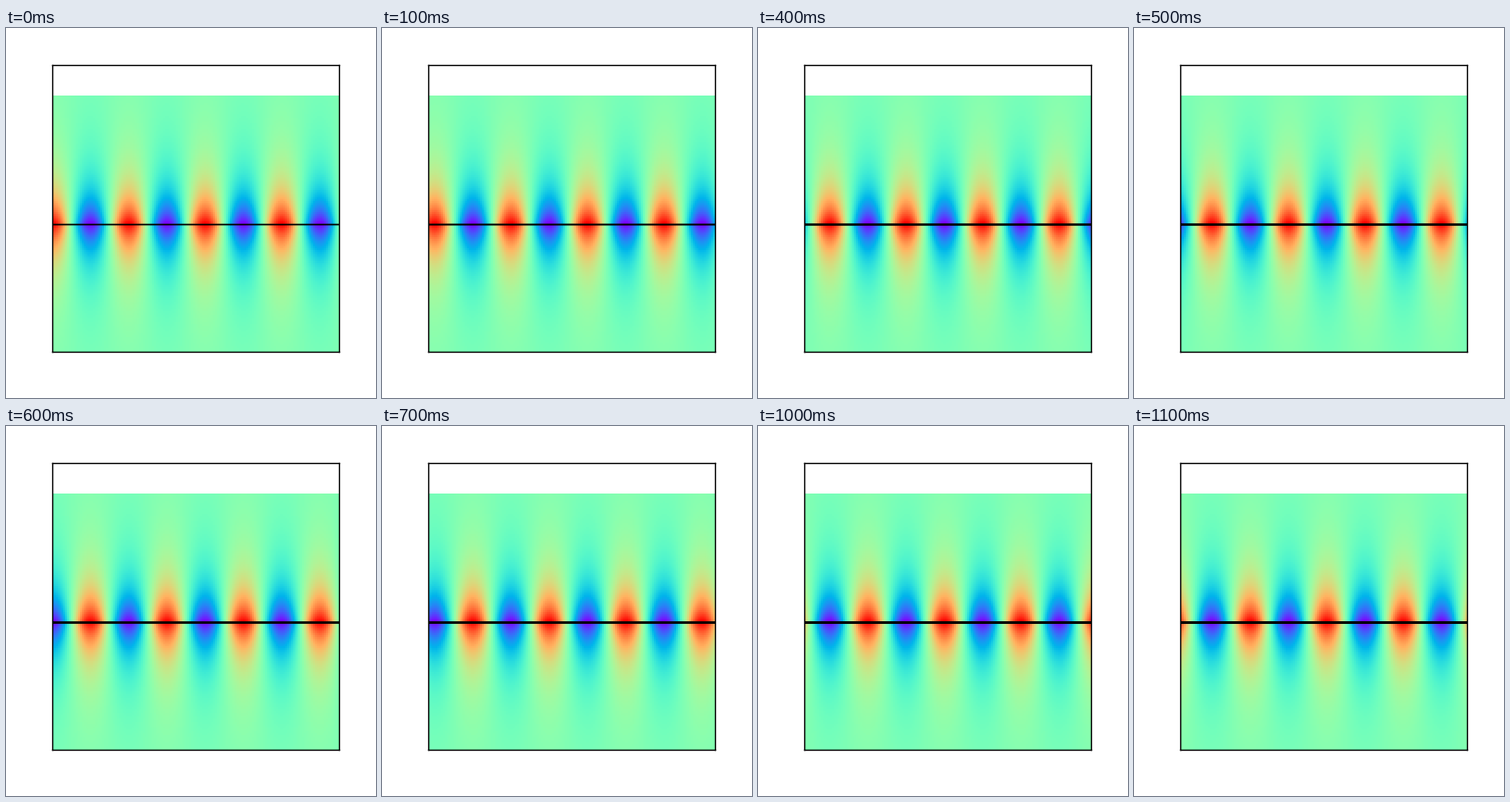
Animation of 400x400 px, one loop 1200 ms. Source, as a matplotlib script:

```python
import numpy as np
import matplotlib.pyplot as plt
from matplotlib.animation import FuncAnimation

FRAMES = 12
SIDE = 310          # side of the square axes, px
TOP = 276.8         # height of the field, px
WAVELENGTH = SIDE / 3.75
DECAY = 40.0        # px

fig = plt.figure(figsize=(4, 4), dpi=100, facecolor="white")
ax = fig.add_axes([0.125, 0.125, 0.775, 0.775])
ax.set(xlim=(0, SIDE), ylim=(0, TOP * 1.12), xticks=[], yticks=[])
ax.set_ylim(0, SIDE)
for spine in ax.spines.values():
    spine.set_linewidth(1.0)

nx, ny = 155, 138
x = (np.arange(nx) + 0.5) * SIDE / nx
y = (np.arange(ny) + 0.5) * TOP / ny
envelope = np.exp(-np.abs(y - TOP / 2) / DECAY)[:, None]


def field(i):
    """Surface wave travelling right, bound to the interface."""
    return envelope * np.cos(2 * np.pi * (x / WAVELENGTH - i / FRAMES))


image = ax.imshow(field(0), cmap="rainbow", vmin=-1, vmax=1, origin="lower",
                  extent=(0, SIDE, 0, TOP), interpolation="nearest",
                  aspect="auto")
halo = ax.axhline(TOP / 2, color="black", lw=3 * 0.72)
ax.axhline(TOP / 2, color="black", lw=0.72)


def update(i):
    image.set_data(field(i))
    # the soft edge of the interface darkens as the loop goes on
    halo.set_alpha(1 - 0.805 ** (i + 2))
    return image, halo


anim = FuncAnimation(fig, update, frames=FRAMES, interval=100,
                     init_func=lambda: update(0), repeat=True, repeat_delay=0)
plt.show()
```
